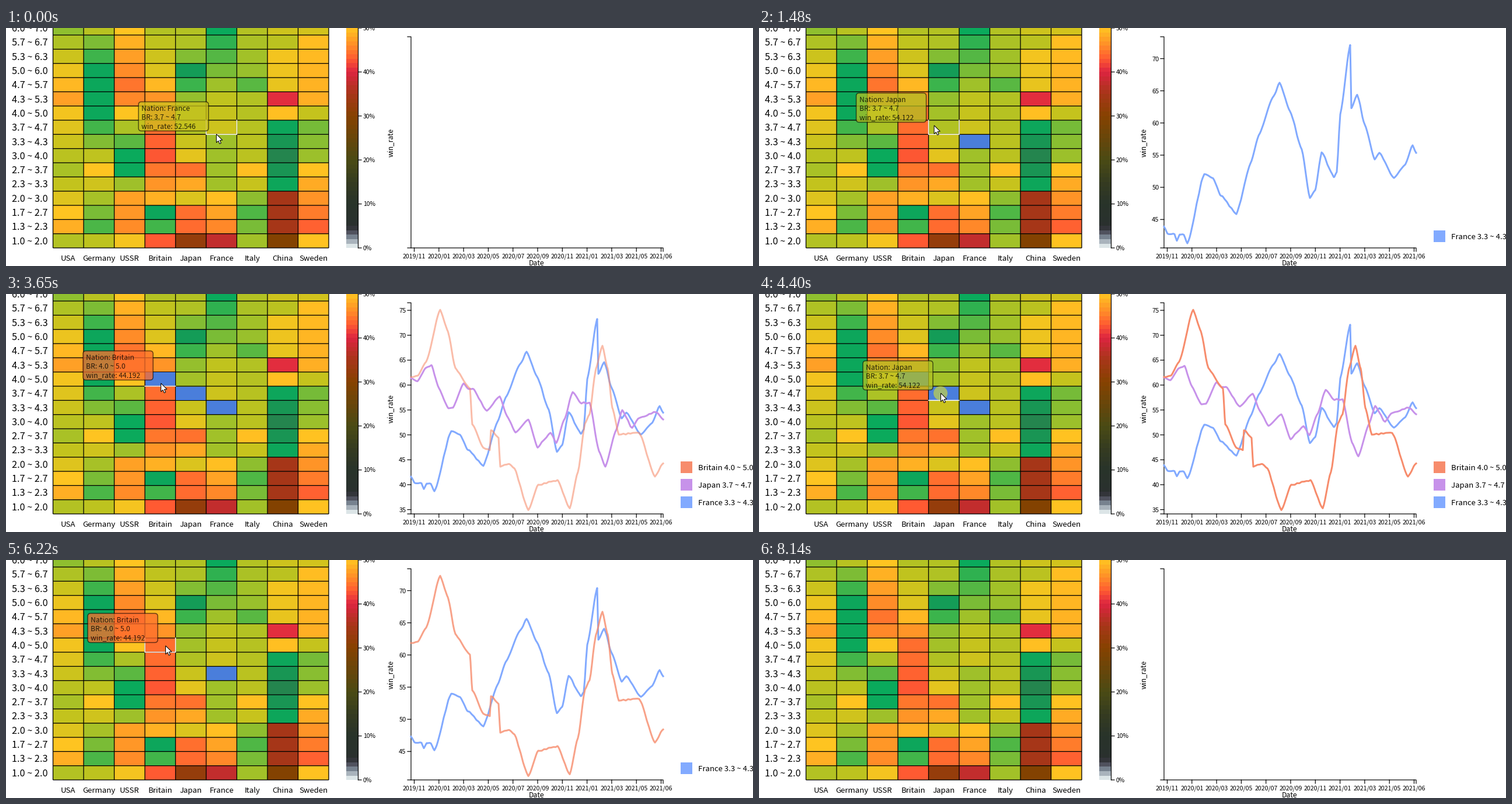
Animation of 1280 by 408 pixels, one loop 8.27 s. Source, as a matplotlib script:

```python
import numpy as np
import matplotlib.pyplot as plt
from matplotlib.animation import FuncAnimation
from matplotlib.colors import LinearSegmentedColormap
from matplotlib.patches import Circle, FancyBboxPatch, Polygon, Rectangle

W, H, DPI = 1280, 408, 100
LOOP, FRAMES = 8270, 236
PT = 72 / DPI  # points per pixel
plt.rcParams["font.family"] = ["Noto Sans CJK JP", "DejaVu Sans"]

# key (row, win rate) pairs per nation, joined linearly
RATES = {
    "USA": [(0, 54), (1, 48.5), (5, 54.6), (9, 50.5), (10, 47.4), (15, 56)],
    "Germany": [(0, 53.4), (1, 59.5), (5, 50), (9, 63.3), (12, 63.5), (15, 53.7)],
    "USSR": [(0, 50.4), (1, 46), (3, 47.5), (5, 62.9), (6, 63), (10, 45.8),
             (11, 44.6), (15, 50)],
    "Britain": [(0, 43), (1, 60), (2, 63.5), (3, 48.6), (6, 42.8), (8, 44.125),
                (9, 44.192), (12, 51.6), (15, 54)],
    "Japan": [(0, 32.3), (1, 44), (2, 44.3), (3, 51.7), (5, 44.4), (6, 51.2),
              (8, 54.122), (10, 55.7), (12, 65), (13, 56.6), (14, 54.2), (15, 54)],
    "France": [(0, 37.6), (1, 45.8), (3, 49.6), (4, 55), (7, 55.246), (8, 52.546),
               (10, 53.2), (15, 63)],
    "Italy": [(0, 55), (2, 59.3), (5, 49.6), (6, 53.5), (10, 54), (11, 58.8),
              (12, 55.5), (15, 54)],
    "China": [(0, 29.5), (1, 35), (3, 35), (4, 63.6), (6, 68.5), (8, 63.5),
              (9, 49.6), (10, 40.5), (11, 51), (13, 50.5), (14, 53.5), (15, 52.5)],
    "Sweden": [(0, 49.8), (1, 43.4), (5, 49.8), (6, 55.4), (8, 57.3), (10, 48.5),
               (14, 49.5), (15, 52.2)],
}
NATIONS = list(RATES)
ROWS = 16
WIN = np.array([np.interp(range(ROWS), *zip(*k)) for k in RATES.values()]).T

STOPS = [(0, "#f0ffff"), (1, "#c8ccd0"), (2, "#8a9aa8"), (4, "#3d3a45"),
         (5, "#2a302f"), (10, "#28332a"), (15, "#353b20"), (20, "#4a4a14"),
         (30, "#864200"), (35, "#a63618"), (40, "#dc2440"), (43, "#ff5a32"),
         (46, "#ff8c28"), (50, "#ffc421"), (51, "#e8c41e"), (53, "#c4c31d"),
         (55, "#a3c128"), (60, "#42b54a"), (63, "#0aaa5c"), (68.5, "#24854e"),
         (100, "#24854e")]
CMAP = LinearSegmentedColormap.from_list("rate", [(v / 100, c) for v, c in STOPS], N=2000)

LEFT, BASE, CW, CH = 80.5, 377, 52.5, 24.33
BLUE = "#4a7edb"

# y scales: (value, its y, pixels per unit)
NEAR, WIDE = (70, 52.5, 11.03), (75, 28, 8.54)

# turning points of the curves, in pixels
FRANCE = [(694, 341), (700, 352), (712, 354), (716, 365), (721, 354), (728, 355),
          (734, 369), (763, 250), (778, 258), (792, 288), (818, 319), (842, 233),
          (857, 182), (881, 118), (892, 94), (910, 143), (930, 208), (944, 291),
          (953, 278), (964, 213), (985, 255), (990, 247), (996, 148), (1013, 30),
          (1015, 138), (1025, 113), (1038, 166), (1055, 226), (1063, 214),
          (1088, 257), (1107, 234), (1120, 201), (1126, 215)]
JAPAN = [(694, 146), (705, 152), (719, 126), (729, 121), (742, 166), (758, 205),
         (766, 203), (784, 156), (793, 168), (800, 168), (824, 210), (846, 182),
         (859, 222), (873, 253), (895, 228), (911, 282), (933, 254), (943, 273),
         (957, 226), (971, 173), (986, 196), (1000, 194), (1016, 290), (1027, 321),
         (1045, 249), (1056, 209), (1073, 245), (1083, 226), (1114, 212), (1126, 227)]
BRITAIN = [(694, 141), (706, 140), (720, 116), (744, 27), (757, 63), (770, 128),
           (795, 162), (799, 223), (818, 263), (829, 267), (831, 233), (844, 246),
           (847, 295), (862, 291), (871, 299), (895, 371), (912, 327), (945, 319),
           (966, 368), (980, 304), (992, 222), (1000, 206), (1011, 127), (1022, 89),
           (1031, 127), (1039, 195), (1050, 241), (1085, 238), (1112, 313), (1126, 290)]

# cell (column, row), colour, points, scale of the points
SERIES = [((5, 7), "#82aaff", FRANCE, NEAR),
          ((4, 8), "#c792ea", JAPAN, NEAR),
          ((3, 9), "#f78c6c", BRITAIN, WIDE)]
F, J, B = range(3)
STATES = [(-9999, []), (740, [F]), (2090, [F, J]), (3380, [F, J, B]),
          (4750, [F, B]), (6020, [F]), (7660, [])]
FADE = 500

MOUSE = [(0, 360, 182), (60, 360, 182), (340, 359, 190), (1080, 359, 190),
         (1480, 299.5, 167), (2260, 299.5, 167), (2430, 282, 163), (2710, 264, 149),
         (2950, 265, 153), (3680, 265, 153), (4000, 311, 170), (4980, 311, 170),
         (5320, 273, 147), (6230, 273, 147), (6640, 352, 186), (6900, 348, 185),
         (7190, 344, 189), (7330, 344, 189), (7620, 1300, 372), (LOOP, 1300, 372)]
CLICKS = [(340, 410), (1610, 1760), (2950, 3050), (4330, 4400), (5620, 5690), (7190, 7330)]

fig = plt.figure(figsize=(W / DPI, H / DPI), dpi=DPI, facecolor="white")
ax = fig.add_axes([0, 0, 1, 1])
ax.set(xlim=(0, W), ylim=(H, 0))
ax.axis("off")


def text(x, y, s, size, ha="center", **kw):
    """Text whose digits are centred on y."""
    return ax.text(x, y + 0.367 * size, s, fontsize=size * PT, ha=ha, va="baseline", **kw)


def line(xs, ys, color="black", width=1.2, **kw):
    return ax.plot(xs, ys, color=color, lw=width * PT, snap=False, **kw)[0]


def span(row):
    low = 1 + row // 3 + (0, 0.3, 0.7)[row % 3]
    return f"{low:.1f} ~ {low + 1:.1f}"


def rate_color(value):
    return CMAP(value / 100)


def smooth(u):
    return u * u * (3 - 2 * u)


# heatmap
xs = LEFT + CW * np.arange(len(NATIONS) + 1)
ys = BASE - CH * np.arange(ROWS + 1)
mesh = ax.pcolormesh(xs, ys, WIN, cmap=CMAP, vmin=0, vmax=100)
ax.vlines(xs, 0, BASE, color="black", lw=1.3 * PT, snap=False)
ax.hlines(ys, xs[0], xs[-1], color="black", lw=1.3 * PT, snap=False)
picked = [ax.add_patch(Rectangle((xs[c] + 0.6, ys[r + 1] + 0.6), CW - 1.2, CH - 1.2,
                                 fc=BLUE, lw=0, zorder=2.5))
          for (c, r), *_ in SERIES]
for r in range(ROWS):
    text(72, BASE - (r + 0.5) * CH, span(r), 16.3, "right")
for c, name in enumerate(NATIONS):
    text(LEFT + (c + 0.5) * CW, 394.5, name, 13.2)

# colour bar
for p in range(51):
    ax.add_patch(Rectangle((583, BASE - (p + 1) * 7.54), 20, 7.6,
                           fc=rate_color(p + 0.5), lw=0))
line([603.5, 603.5], [0, 377])
for p in range(0, 60, 10):
    y = BASE - p * 7.54
    line([603.5, 609], [y, y])
    text(612, y, f"{p}%", 10.4, "left")

# chart frame
line([688, 694, 694, 688], [15, 15, 377, 377])
line([694, 1126, 1126], [377, 377, 383])
for k in range(11):
    x, month = 699.5 + k * 42.3, min(10 + 2 * k, 29)
    line([x, x], [377, 383])
    text(x, 390.5, f"{2019 + month // 12}/{month % 12 + 1:02d}", 10.5)
text(909.5, 403, "Date", 12.2)
ax.text(659, 196, "win_rate", fontsize=11.9 * PT, rotation=90, ha="center", va="center")


def to_y(values, scale):
    v0, y0, k = scale
    return y0 + (v0 - values) * k


def ticks(scale, low, high):
    out = []
    for v in range(low, high + 1, 5):
        y = to_y(v, scale)
        out += [line([688, 694], [y, y]), text(685.5, y, str(v), 11, "right")]
    return out


def trace(points, rng):
    """Soft bends between turning points, with a slight daily wobble."""
    px, py = np.array(points, float).T
    x = np.union1d(np.arange(694, 1127, 2), px)
    k = np.clip(np.searchsorted(px, x, "right") - 1, 0, len(px) - 2)
    u = (x - px[k]) / (px[k + 1] - px[k])
    y = py[k] + (py[k + 1] - py[k]) * (u + smooth(u)) / 2
    days = np.arange(694, 1131, 4)
    return x, y + np.interp(x, days, rng.normal(0, 0.7, len(days)))


near_ticks, wide_ticks = ticks(NEAR, 45, 70), ticks(WIDE, 35, 75)

rng = np.random.default_rng(4)
curves, keys = [], []
for (c, r), color, points, (v0, y0, k) in SERIES:
    x, y = trace(points, rng)
    curve = line(x, y, color, 3, solid_joinstyle="round", zorder=3)
    curves.append((curve, v0 - (y - y0) / k))
    box = ax.add_patch(Rectangle((1156, 347), 20, 20, fc=color, lw=0))
    keys.append((box, text(1186, 357, f"{NATIONS[c]} {span(r)}", 13.2, "left")))

# pointer and tooltip
edge = line([], [], "white", 1.5, zorder=4)
tip_box = ax.add_patch(FancyBboxPatch(
    (0, 0), 120, 50, boxstyle="round,pad=0,rounding_size=5", lw=1.5 * PT,
    ec=(0, 0, 0, 0.6), zorder=6))
tip_rows = [text(0, 0, "", 12.1, "left", color="#000000", alpha=0.8, zorder=7)
            for _ in range(3)]
ring = ax.add_patch(Circle((0, 0), 12, fc="#ffff00", alpha=0.47, lw=0, zorder=8))
ARROW = np.array([(0, 0), (0, 14.5), (3.3, 11.4), (5.6, 16.5), (8, 15.4),
                  (5.8, 10.5), (10.3, 10.2)])
arrow = ax.add_patch(Polygon(ARROW, fc="white", ec="black", lw=PT, zorder=9))


def ease(u):
    u = min(max(u, 0), 1)
    return 4 * u ** 3 if u < 0.5 else 1 - 4 * (1 - u) ** 3


def mouse(t):
    for (t0, x0, y0), (t1, x1, y1) in zip(MOUSE, MOUSE[1:]):
        if t <= t1:
            u = smooth((t - t0) / (t1 - t0))
            return x0 + (x1 - x0) * u, y0 + (y1 - y0) * u


def hovered(t):
    x, y = mouse(t)
    c, r = int((x - LEFT) // CW), int((BASE - y) // CH)
    return (c, r) if 0 <= c < len(NATIONS) and 0 <= r < ROWS else None


def draw_chart(t):
    k = max(i for i, s in enumerate(STATES) if s[0] <= t)
    start, now = STATES[k]
    before = STATES[max(k - 1, 0)][1]
    e = ease((t - start) / FADE)
    new_scale = WIDE if B in now else NEAR
    old_scale = WIDE if B in before else NEAR
    for a in near_ticks:
        a.set_visible(bool(now) and new_scale is NEAR)
    for a in wide_ticks:
        a.set_visible(new_scale is WIDE)
    for i, (curve, values) in enumerate(curves):
        y_new, y_old = to_y(values, new_scale), to_y(values, old_scale)
        if i in now and i in before:
            alpha, y = 1, y_old + (y_new - y_old) * e
        elif i in now:
            alpha, y = e, y_new
        else:
            alpha, y = (1 - e if i in before else 0), y_old
        curve.set_ydata(y)
        curve.set_alpha(alpha)

        box, label = keys[i]
        for a in (box, label, picked[i]):
            a.set_visible(i in now)
        if i in now:
            top = 347 - 30 * now.index(i)
            box.set_y(top)
            label.set_y(top + 10 + 0.367 * 13.2)
    return [SERIES[i][0] for i in now]


def draw_pointer(t, selected):
    x, y = mouse(t)
    arrow.set_xy(ARROW + (x + 0.5, y))
    ring.center = x, y
    ring.set_visible(any(a <= t < b for a, b in CLICKS))

    cell = hovered(t)
    for a in (edge, tip_box, *tip_rows):
        a.set_visible(cell is not None)
    if cell is None:
        return
    c, r = cell
    x0, x1, y0, y1 = xs[c], xs[c + 1], ys[r + 1], ys[r]
    if cell in selected:
        edge.set_data([x0, x1], [y1, y1])
    else:
        edge.set_data([x0, x0, x1, x1], [y0, y1, y1, y0])

    left, top = x - 133, y - 55.5
    tip_box.set_bounds(left, top, 120, 50)
    pc, pr = hovered(max(t - 120, 0)) or cell  # colour trails the pointer
    tip_box.set_facecolor((*rate_color(WIN[pr, pc])[:3], 0.75))
    lines = (f"Nation: {NATIONS[c]}", f"BR: {span(r)}", f"win_rate: {WIN[r, c]:.3f}")
    for k, (row, s) in enumerate(zip(tip_rows, lines)):
        row.set_text(s)
        row.set_position((left + 5, top + 11 + 15 * k + 0.367 * 12.1))


def update(i):
    t = i * LOOP / FRAMES
    draw_pointer(t, draw_chart(t))
    return []


anim = FuncAnimation(fig, update, frames=FRAMES, interval=LOOP / FRAMES,
                     init_func=lambda: update(0), repeat=True, repeat_delay=0)
plt.show()
```
